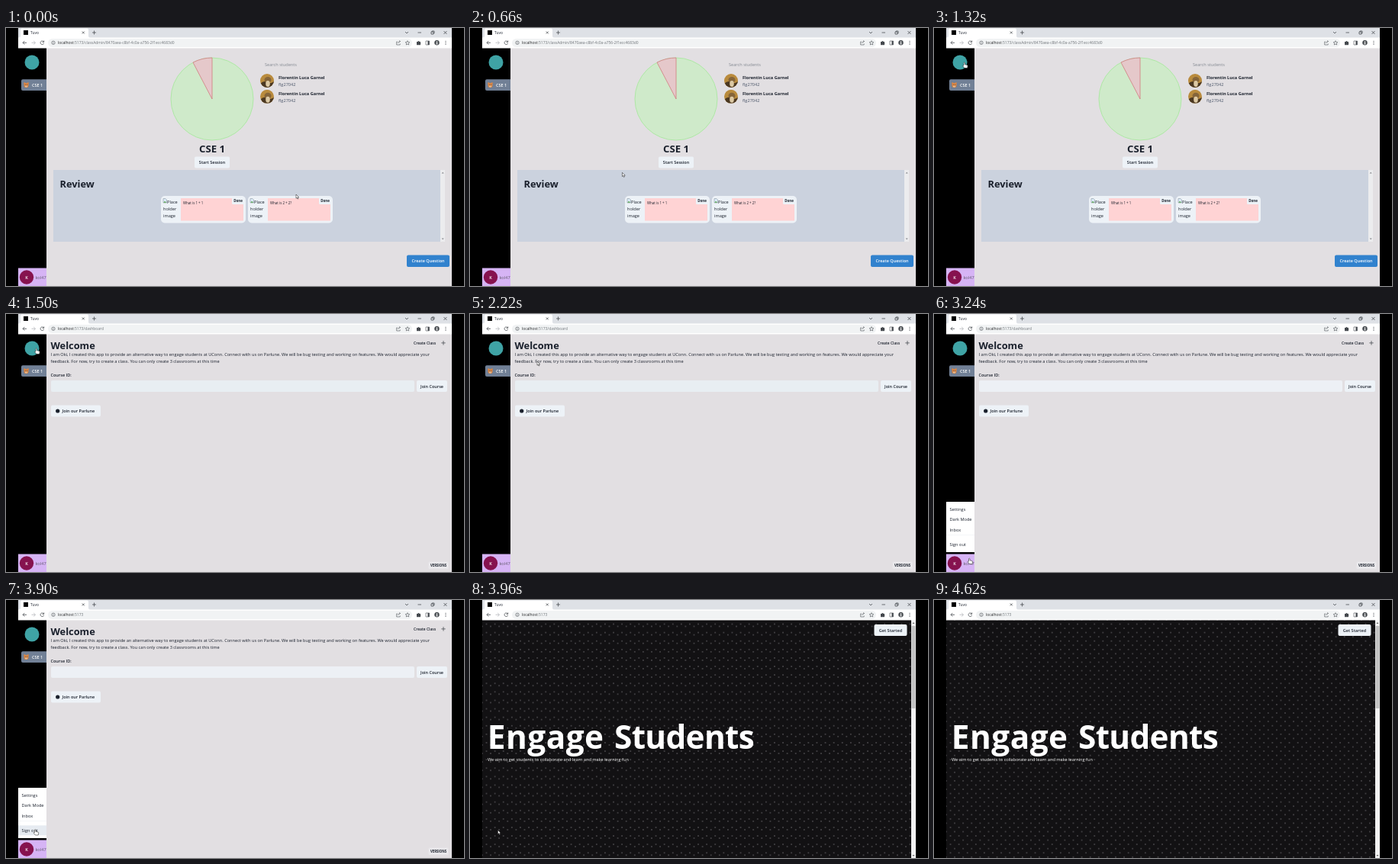
An HTML page that plays this animation: 600 by 338 pixels, repeating every 4680 ms.

```html
<!DOCTYPE html>
<html lang="en">
<head>
<meta charset="utf-8">
<title>Class dashboard</title>
<style>
  html, body { margin: 0; width: 100%; height: 100%; overflow: hidden; background: #000; }
  svg { display: block; width: 100%; height: 100%; }
  text { font: 5.64px "Open Sans", "Noto Sans", sans-serif; fill: #1a202c; white-space: pre; }
  .semi { font-weight: 600; font-size: 5.5px; }
  .bold { font-weight: 700; }
  .head { font-weight: 700; font-size: 12.8px; }
  .hero { font-weight: 700; font-size: 42.3px; fill: #fff; }
  .url { font-size: 4.95px; fill: #70757a; }
  .small { font-size: 4.45px; }
  .mid { text-anchor: middle; }
  .white { fill: #fff; }
  .grey { fill: #4a5568; }
  .hint { fill: #838991; }
  .icon { fill: none; stroke: #4b4f54; stroke-width: .8; }
  .btn { fill: #edf2f7; }
</style>
</head>
<body>
<svg viewBox="0 0 600 338" preserveAspectRatio="none">
  <defs>
    <clipPath id="side"><rect x="16" y="26" width="37" height="312"/></clipPath>
    <clipPath id="view"><rect x="16" y="0" width="568" height="338"/></clipPath>
    <clipPath id="round"><circle r="9"/></clipPath>
    <pattern id="dotsA" width="11.1" height="11.1" patternUnits="userSpaceOnUse">
      <circle cx="5.55" cy="5.55" r=".6" fill="#908e92"/>
    </pattern>
    <pattern id="dotsB" href="#dotsA" width="11.1" height="11.1" patternUnits="userSpaceOnUse">
      <circle cx="5.55" cy="5.55" r=".6" fill="#908e92"/>
    </pattern>
    <g id="photo" clip-path="url(#round)">
      <rect x="-9" y="-9" width="18" height="18" fill="#b98b3d"/>
      <path d="M-9 4Q-4 -1 0 2T9 1V9H-9Z" fill="#4b3822"/>
      <ellipse cx="1" cy="-1" rx="4.5" ry="4" fill="#85653a"/>
      <ellipse cx="1" cy="4" rx="2.8" ry="4" fill="#dcc9a4"/>
    </g>
    <g id="card">
      <rect class="btn" x="203" y="220" width="111" height="35.5" rx="5"/>
      <rect x="229" y="223" width="82" height="29.5" fill="#ffd3d4"/>
      <rect class="btn" x="296" y="222" width="16" height="9" rx="1.5"/>
      <text class="small bold" x="298.2" y="228">Done</text>
      <path d="M206 223.5h3l1.5 1.5v4h-4.5z" fill="#dcebf8" stroke="#7b8793" stroke-width=".5"/>
      <path d="M206.3 228.7l1.7-2 2.2 2z" fill="#55a14a"/>
      <text x="211" y="230">Place</text>
      <text x="206" y="239">holder</text>
      <text x="206" y="248">image</text>
    </g>
  </defs>

  <rect width="600" height="338"/>
  <g clip-path="url(#view)">
    <!-- signed-in pages -->
    <g id="app">
      <rect x="53" y="26" width="531" height="312" fill="#e2dfe2"/>
      <g id="room">
        <circle cx="270" cy="93" r="54" fill="#cfeaca" stroke="#a5e79b" stroke-width=".8"/>
        <path d="M270 93L245 45.1A54 54 0 0 1 270 39Z" fill="#e5c8ca" stroke="#cf7074" stroke-width=".7"/>
        <text class="head mid" x="270" y="163" style="font-size:13.2px">CSE 1</text>
        <rect class="btn" x="247" y="168.5" width="46" height="15" rx="2"/>
        <text class="semi mid" x="270" y="178">Start Session</text>
        <text class="hint" x="339" y="50">Search students</text>
        <g id="student">
          <use href="#photo" x="342" y="69"/>
          <text class="bold" x="357" y="67.4">Florentin Luca Garnel</text>
          <text class="grey" x="357" y="76">flg27042</text>
        </g>
        <use href="#student" y="20.8"/>
        <rect x="62" y="186" width="507" height="94" fill="#cbd2de"/>
        <rect x="569" y="186" width="6" height="94" fill="#ececee"/>
        <path d="M570.7 190.5l1.5-1.8 1.5 1.8zM570.7 275.5l1.5 1.8 1.5-1.8z" fill="#85878b"/>
        <text class="head" x="70.5" y="208.7">Review</text>
        <use href="#card"/><use href="#card" x="114"/>
        <text class="small" x="232" y="231">What is 1 + 1</text>
        <text class="small" x="346" y="231">What is 2 + 2?</text>
        <rect x="525" y="297.5" width="56" height="15.5" rx="2" fill="#3182ce"/>
        <text class="semi mid white" x="553" y="307.3">Create Question</text>
      </g>
      <g id="dash">
        <text class="head" x="58.5" y="46">Welcome</text>
        <text x="58.5" y="55.2">I am Oki, I created this app to provide an alternative way to engage students at UConn. Connect with us on Parlune. We will be bug testing and working on features. We would appreciate your</text>
        <text x="58.5" y="64.2">feedback. For now, try to create a class. You can only create 3 classrooms at this time</text>
        <text class="semi" x="534" y="40" style="font-size:4.95px">Create Class</text>
        <path class="icon" d="M573 35.2v5.4m-2.7-2.7h5.4"/>
        <text class="semi" x="58.5" y="82">Course ID:</text>
        <rect id="field" x="59" y="87" width="476" height="15" rx="2"/>
        <rect class="btn" x="538" y="87" width="40" height="15" rx="2"/>
        <text class="semi mid" x="558" y="96.7">Join Course</text>
        <rect class="btn" x="59" y="119.5" width="65" height="15" rx="2"/>
        <circle cx="67.7" cy="127" r="2.6" fill="#1a202c"/>
        <text class="semi" x="73.5" y="129.2">Join our Parlune</text>
        <rect x="553.5" y="324.5" width="26" height="9.5" rx="1.5" fill="#e9e8eb"/>
        <text class="bold mid" x="566.5" y="331" style="font-size:4.3px">VERSIONS</text>
      </g>
      <g clip-path="url(#side)">
        <rect x="16" y="26" width="37" height="312"/>
        <circle cx="34" cy="45" r="9.5" fill="#3fa3a5"/>
        <rect x="20" y="67.3" width="36" height="14.7" rx="2" fill="#718096"/>
        <g fill="#d98545">
          <circle cx="24.3" cy="72.4" r="1.2"/><circle cx="28.7" cy="72.4" r="1.2"/>
          <circle cx="26.5" cy="75" r="3.1"/>
        </g>
        <ellipse cx="26.5" cy="76.4" rx="1.5" ry="1.1" fill="#f3d2ac"/>
        <circle cx="25.3" cy="74.3" r=".4"/><circle cx="27.7" cy="74.3" r=".4"/><circle cx="26.5" cy="75.9" r=".4"/>
        <text class="semi white" x="34" y="77">CSE 1</text>
        <rect x="16" y="314.5" width="37" height="24" fill="#d6b4f5"/>
        <circle cx="27" cy="326.5" r="9.2" fill="#86124f"/>
        <text class="semi mid white" x="27" y="328.6">K</text>
        <text x="38.5" y="329" style="fill:#625b6d">kol47</text>
        <g id="menu">
          <rect x="15" y="246" width="44" height="66" rx="2" fill="#fff"/>
          <path d="M16 289.5h37" stroke="#e2e8f0" stroke-width=".4"/>
          <rect id="hover" x="16" y="295.3" width="37" height="13" fill="#e6ebf1"/>
          <text x="20.5" y="258">Settings</text>
          <text x="20.5" y="271.3">Dark Mode</text>
          <text x="20.5" y="284.5">Inbox</text>
          <text x="20.5" y="304">Sign out</text>
        </g>
      </g>
    </g>

    <!-- landing page -->
    <g id="home">
      <rect x="16" y="26" width="568" height="312" fill="#121113"/>
      <rect x="16" y="26" width="562" height="312" fill="url(#dotsA)"/>
      <rect x="16" y="26" width="562" height="312" fill="url(#dotsB)"/>
      <text class="hero" y="194.7"><tspan x="22.8" letter-spacing=".5">Engage</tspan><tspan x="189" letter-spacing="-.65">Students</tspan></text>
      <text class="white" x="23" y="210.8">We aim to get students to collaborate and learn and make learning fun</text>
      <rect class="btn" x="529.5" y="32.1" width="43" height="15" rx="2"/>
      <text class="semi mid" x="551" y="41.9">Get Started</text>
      <rect x="578" y="26" width="6" height="312" fill="#f1f1f1"/>
      <rect x="578.6" y="34" width="4.8" height="108" fill="#c1c1c1"/>
      <path d="M579.5 31l1.5-1.8 1.5 1.8zM579.5 334l1.5 1.8 1.5-1.8z" fill="#606060"/>
    </g>

    <!-- browser frame -->
    <rect x="16" width="568" height="13" fill="#dee1e6"/>
    <path d="M16 13q3 0 3-3V2.5q0-2 2-2h85q2 0 2 2V10q0 3 3 3z" fill="#fff"/>
    <rect x="16" y="12.5" width="568" height="14" fill="#fff"/>
    <rect x="55" y="14" width="477" height="11" rx="5.5" fill="#f1f3f4"/>
    <rect x="23" y="3" width="6" height="6"/>
    <text x="32" y="8" style="font-size:4.9px">Tuvo</text>
    <g class="icon">
      <path d="M99.8 4.5l3 3m0-3l-3 3M115.5 3.5v5m-2.5-2.5h5"/>
      <path d="M523 5l2 2 2-2M539.5 6h4.5M557 5h3v3h-3zM558 5V4h3v3h-1M573.5 4l4 4m0-4l-4 4"/>
      <path d="M27 19.3h-5m2.3-2.3l-2.3 2.3 2.3 2.3"/>
      <path d="M33.5 19.3h5m-2.3-2.3l2.3 2.3-2.3 2.3" stroke="#b5b8bc"/>
      <path d="M49.3 18a2.3 2.3 0 1 0 .3 2M49.7 16.5v2h-2"/>
      <g stroke-width=".6">
        <circle cx="62" cy="19.3" r="2.2"/><path d="M62 19v1.5M62 17.8v.6"/>
        <path d="M513 18h-1.3v4h4.5v-1.5M513.5 20q.3-2.5 3-2.5m-1.2-1.2l1.2 1.2-1.2 1.2"/>
        <path d="M526 16.7l.8 1.8 2 .2-1.5 1.3.4 2-1.7-1-1.7 1 .4-2-1.5-1.3 2-.2z"/>
        <path d="M550 17h4.500v5H550z"/>
      </g>
    </g>
    <g fill="#45494e">
      <path d="M538 18h1.5a1 1 0 0 1 2 0h1.500v1.5a1 1 0 0 1 0 1.5v1.2h-5z"/>
      <rect x="552.5" y="17" width="2" height="5"/>
      <circle cx="564.5" cy="19.3" r="3.2"/>
      <circle cx="576" cy="17.3" r=".6"/><circle cx="576" cy="19.3" r=".6"/><circle cx="576" cy="21.3" r=".6"/>
    </g>
    <circle cx="564.5" cy="18.5" r="1" fill="#fff"/>
    <path d="M562.7 21.2q1.8-2.2 3.6 0z" fill="#fff"/>
    <text class="url" x="68" y="21.2"><tspan fill="#202124">localhost</tspan>:5173<tspan id="path"></tspan></text>

    <path id="arrow" d="M0 0V5.2L1.2 4.1 2 6 3 5.6 2.2 3.8H3.8Z" fill="#fff" stroke="#111" stroke-width=".5"/>
    <path id="hand" d="M0 .6Q.8-.5 1.5.6V2.8L4.5 3.5Q5.3 3.8 5.2 5L4.7 7.5H1L-1.5 4.6Q-1.2 3.5 0 4.2Z" fill="#fff" stroke="#111" stroke-width=".5"/>
  </g>
</svg>
<script>
const LOOP = 4680, STEP = 60;
const $ = id => document.getElementById(id);

// time, x, y of the pointer tip
const route = [
  [0, 380, 218], [480, 209, 198], [600, 209, 198], [960, 80, 81],
  [1080, 80, 81], [1320, 39, 45], [1980, 39, 45], [2220, 88, 62],
  [2340, 88, 62], [2820, 45.5, 320], [3360, 45.5, 320], [3840, 37.5, 300.5],
  [3900, 37.5, 300.5], [3960, 36.5, 301.5], [4440, 26, 346], [LOOP, 26, 346]
];
const hands = [[1260, 2100], [2760, 3420], [3720, 3960]];

const clamp = v => Math.max(0, Math.min(1, v));
const ease = v => v * v * (3 - 2 * v);
const ramp = (t, a, b) => ease(clamp((t - a) / (b - a)));
const show = (id, on) => $(id).style.display = on ? "" : "none";

function pointer(t) {
  const i = route.findIndex(p => p[0] > t);
  const [a, x, y] = route[i - 1], [b, u, v] = route[i];
  const k = ramp(t, a, b);
  return [x + (u - x) * k, y + (v - y) * k];
}

function draw(t) {
  const room = t < 1500, home = t >= 3960;
  show("app", !home);
  show("home", home);
  show("room", room);
  show("dash", !room);
  $("path").textContent = room ? "/classAdmin/8470aea-c8bf-4c0a-a756-2f1ecc4683d0"
    : t < 3900 ? "/dashboard" : "";
  $("field").setAttribute("fill", t < 2940 ? "#e8eef2" : "#edf0f5");

  const open = ramp(t, 2880, 3120), s = .8 + .2 * open;
  $("menu").setAttribute("opacity", open);
  $("menu").setAttribute("transform", `translate(16 312) scale(${s}) translate(-16 -312)`);
  $("hover").setAttribute("opacity", t >= 3600 ? 1 : 0);

  // the second lattice settles midway between the dots of the first
  const drift = clamp((t - 3960) / 660);
  $("dotsA").setAttribute("patternTransform", "translate(16 26)");
  $("dotsB").setAttribute("patternTransform", `translate(21.55 ${29 + 2.55 * drift})`);

  const [x, y] = pointer(t);
  const hand = hands.some(([a, b]) => t >= a && t < b);
  show("hand", hand);
  show("arrow", !hand);
  $(hand ? "hand" : "arrow").setAttribute("transform", `translate(${x} ${y})`);
}

const start = performance.now();
function tick() {
  const t = (performance.now() - start) % LOOP;
  draw(Math.floor(t / STEP) * STEP);
  requestAnimationFrame(tick);
}
tick();
</script>
</body>
</html>
```
